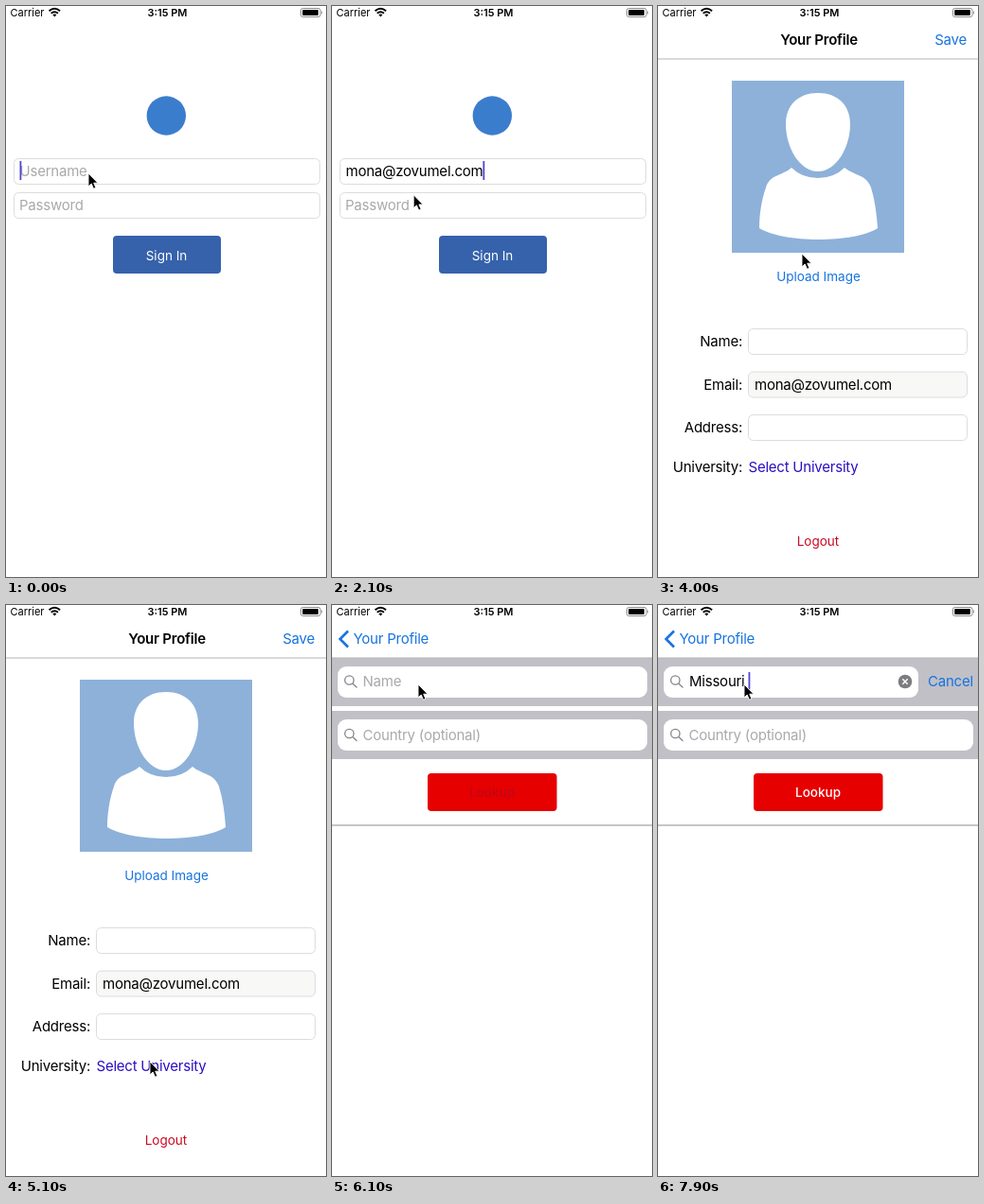
An HTML page for the animation above (8000 ms loop, 338 by 604 pixels).

```html
<!DOCTYPE html>
<html lang="en">
<head>
<meta charset="utf-8">
<title>Sign in and search</title>
<style>
  html, body { margin: 0; width: 100%; height: 100%; overflow: hidden; background: #fff; }
  svg { display: block; }
  text { font: 15px Inter, "Liberation Sans", sans-serif; letter-spacing: -.015em; white-space: pre; fill: #000; }
  .small { font-size: 13.5px; letter-spacing: 0; }
  .status { font-size: 11px; letter-spacing: 0; }
  .bold { font-weight: 600; }
  .mid { text-anchor: middle; }
  .end { text-anchor: end; }
  .hint { fill: #a9a9ac; }
  .link { fill: #1673e0; }
  .light { fill: #fff; }
  .field { fill: #fff; stroke: #dcdcdc; }
  .caret { fill: #4f46d2; }
  .glass { fill: none; stroke: #85858a; stroke-width: 1.3; stroke-linecap: round; }
</style>
</head>
<body>
<svg width="338" height="604" viewBox="0 0 338 604">
  <defs>
    <path id="glass" class="glass" d="M23 79.500a4.700 4.700 0 1 1-9.400 0a4.700 4.700 0 1 1 9.400 0M21.800 83l4.200 4"/>
  </defs>
  <rect width="338" height="604" fill="#fff"/>

  <g id="login">
    <circle cx="169.300" cy="116" r="20.700" fill="#3b7dcd"/>
    <rect class="field" x="8.500" y="161.500" width="323" height="27" rx="5"/>
    <rect class="field" x="8.500" y="197.500" width="323" height="27" rx="5"/>
    <text id="userHint" class="hint" x="14.500" y="180">Username</text>
    <text id="user" x="14.500" y="180"></text>
    <text id="passHint" class="hint" x="14" y="216.300">Password</text>
    <g id="dots"></g>
    <text id="pass" y="216.300"></text>
    <rect id="loginCaret" class="caret" width="1.800" height="20"/>
    <g id="signIn">
      <rect x="113" y="243" width="114" height="40" rx="4" fill="#3562ab"/>
      <text class="small mid light" x="169.500" y="268.500">Sign In</text>
    </g>
  </g>

  <g id="app">
    <g id="profile">
      <rect x="78" y="79" width="182" height="182" fill="#8db1d9"/>
      <path fill="#fff" d="M169 92C190 92 203 105 203 125C203 150 188 175 169 175C150 175 135 150 135 125C135 105 148 92 169 92Z
        M141 171C131 180 118 178 114 192C109 206 107 222 107 235C120 243 145 247 169 247C195 247 220 243 232 235C231 220 229 205 225 192C220 178 208 180 197 171Q186 182 169 182Q152 182 141 171Z"/>
      <text class="small mid link" x="169.500" y="290.500">Upload Image</text>
      <rect class="field" x="95.500" y="341.500" width="231" height="27" rx="5"/>
      <rect class="field" x="95.500" y="387" width="231" height="27" rx="5" style="fill:#f8f8f7"/>
      <rect class="field" x="95.500" y="432.500" width="231" height="27" rx="5"/>
      <text class="end" x="89" y="360">Name:</text>
      <text class="end" x="89" y="405.500">Email:</text>
      <text class="end" x="89" y="451">Address:</text>
      <text class="end" x="89" y="492.500">University:</text>
      <text id="email" x="102" y="405.500"></text>
      <text x="95.500" y="492.500" style="fill:#2a0fc4">Select University</text>
      <text class="small mid" x="169" y="571" style="fill:#cc0820">Logout</text>
    </g>
    <rect id="shade" y="56" width="338" height="548"/>

    <g id="search">
      <rect y="56" width="338" height="548" fill="#fff"/>
      <path fill="#c0c0c6" d="M0 56H338V107H0ZM0 112H338V163H0Z"/>
      <rect id="nameBox" x="6" y="65" height="33" rx="9" fill="#fff"/>
      <rect x="6" y="121" width="327" height="33" rx="9" fill="#fff"/>
      <use href="#glass"/>
      <use href="#glass" y="56.500"/>
      <text id="nameHint" class="hint" x="32.500" y="86">Name</text>
      <text id="name" x="33" y="86"></text>
      <text class="hint" x="32.500" y="142.500">Country (optional)</text>
      <rect id="nameCaret" class="caret" y="71" width="1.800" height="18.500"/>
      <g id="clear">
        <circle cx="261" cy="81" r="7.300" fill="#7c7c81"/>
        <path d="M258.300 78.300l5.400 5.400m0-5.400l-5.400 5.400" stroke="#fff" stroke-width="1.400"/>
      </g>
      <text id="cancel" class="link" x="285" y="86">Cancel</text>
      <rect x="101" y="178" width="136.500" height="40" rx="4" fill="#e60000"/>
      <text id="lookup" class="small mid" x="169" y="203" style="font-weight:500">Lookup</text>
      <path d="M0 233H338" stroke="#8e8e8e"/>
    </g>

    <rect width="338" height="56" fill="#fff"/>
    <path d="M0 56H338" stroke="#b4b4b6"/>
    <text id="title" class="bold mid" x="170" y="41">Your Profile</text>
    <text id="save" class="link end" x="326" y="41">Save</text>
    <g id="back">
      <path d="M17 27.500L8.500 36L17 44.500" fill="none" stroke="#1673e0" stroke-width="2.600"/>
      <text id="backLabel" class="link" x="22.500" y="41">Your Profile</text>
    </g>
  </g>

  <text class="status" x="4.500" y="11">Carrier</text>
  <text class="status bold mid" x="170.500" y="11">3:15 PM</text>
  <g fill="none" stroke="#000" stroke-width="1.900">
    <path d="M45.500 5.300Q51.300 .3 57.100 5.300M47.700 7.700Q51.300 4.700 54.900 7.700"/>
    <path d="M51.300 11.400l-2-2.200q2-1.500 4 0z" fill="#000" stroke="none"/>
  </g>
  <rect x="311.500" y="2.500" width="20.500" height="9" rx="2" fill="none" stroke="#8b8b8b"/>
  <rect x="313.200" y="4" width="16.600" height="6" rx=".8"/>
  <path d="M333 5q2 2 0 4z" fill="#8b8b8b"/>

  <path id="pointer" d="M0 0V14L3.200 11L5.500 16.300L7.900 15.200L5.700 10.200H10Z" stroke="#fff" stroke-width=".9"/>
</svg>

<script>
const el = {};
document.querySelectorAll("[id]").forEach(node => el[node.id] = node);

const LOOP = 8000, STEP = 100;
const EMAIL = "mona@zovumel.com", SECRET = "password", QUERY = "Missouri ";
const run = (from, count) => Array.from({ length: count }, (_, i) => from + i * STEP);

// key press times
const userKeys = [...run(100, 4), 600, 700, 1000, ...run(1000, 9)];
const passKeys = [...run(2600, 4), 3100, 3200, 3200, 3300];
const queryKeys = [...run(6800, 8), 7700];

// pointer trips: start, end, x, y
const trips = [
  [1800, 2200, 86, 204],
  [3400, 3700, 152, 262],
  [4300, 4900, 152, 483],
  [5400, 6100, 91, 84]
];

const typed = (keys, t) => keys.filter(k => k <= t).length;
const clamp = v => Math.min(1, Math.max(0, v));
const smooth = v => v * v * (3 - 2 * v);
const show = (node, on) => node.style.opacity = +on;
const shift = (node, x, y = 0) => node.setAttribute("transform", `translate(${x} ${y})`);
const set = (node, values) => { for (const k in values) node.setAttribute(k, values[k]); };
const setText = (node, s) => { if (node.textContent !== s) node.textContent = s; };
const textEnd = node => +node.getAttribute("x") + (node.textContent ? node.getComputedTextLength() : 0);

const dots = [...SECRET].map((_, i) => {
  const dot = document.createElementNS("http://www.w3.org/2000/svg", "circle");
  set(dot, { cx: 18.8 + i * 9.4, cy: 211, r: 3.7 });
  return el.dots.appendChild(dot);
});
el.email.textContent = EMAIL;

function drawLogin(t) {
  const users = typed(userKeys, t), passes = typed(passKeys, t);
  const masked = passes && t < 3500 ? passes - 1 : passes;
  setText(el.user, EMAIL.slice(0, users));
  show(el.userHint, !users);
  show(el.passHint, !passes);
  dots.forEach((dot, i) => show(dot, i < masked));
  set(el.pass, { x: 14.5 + masked * 9.4 });
  setText(el.pass, SECRET.slice(masked, passes));
  const onPass = t >= 2300;
  set(el.loginCaret, { x: textEnd(onPass ? el.pass : el.user), y: onPass ? 201 : 164 });
  show(el.signIn, t === 3800 ? .4 : 1);
}

function drawApp(t) {
  const push = t < 5200 ? 0 : t >= 5500 ? 1 : 1 - Math.exp(-(t - 5100) * .0222);
  shift(el.profile, -100 * push);
  shift(el.search, 338 * (1 - push));
  show(el.shade, .08 * push);
  shift(el.title, -105 * push);
  show(el.title, 1 - push);
  show(el.save, 1 - push);
  show(el.back, push);
  shift(el.backLabel, 105 * (1 - push));

  const count = typed(queryKeys, t), active = t >= 6700;
  setText(el.name, QUERY.slice(0, count));
  set(el.nameBox, { width: active ? 269 : 327 });
  set(el.nameCaret, { x: textEnd(el.name) });
  show(el.nameHint, !count);
  show(el.nameCaret, active);
  show(el.cancel, active);
  show(el.clear, count > 0);
  el.lookup.style.fill = count ? "#fff" : "#c20516";
}

function drawPointer(t) {
  let x = 87, y = 177;
  for (const [from, to, tx, ty] of trips) {
    const p = smooth(clamp((t - from) / (to - from)));
    x += (tx - x) * p;
    y += (ty - y) * p;
  }
  shift(el.pointer, x, y);
}

function draw(t) {
  const inApp = t >= 3900;
  show(el.login, !inApp);
  show(el.app, inApp);
  drawLogin(t);
  drawApp(t);
  drawPointer(t);
}

const start = performance.now();
function tick() {
  const t = (performance.now() - start) % LOOP;
  draw(Math.floor(t / STEP) * STEP);
  requestAnimationFrame(tick);
}
tick();
</script>
</body>
</html>
```
